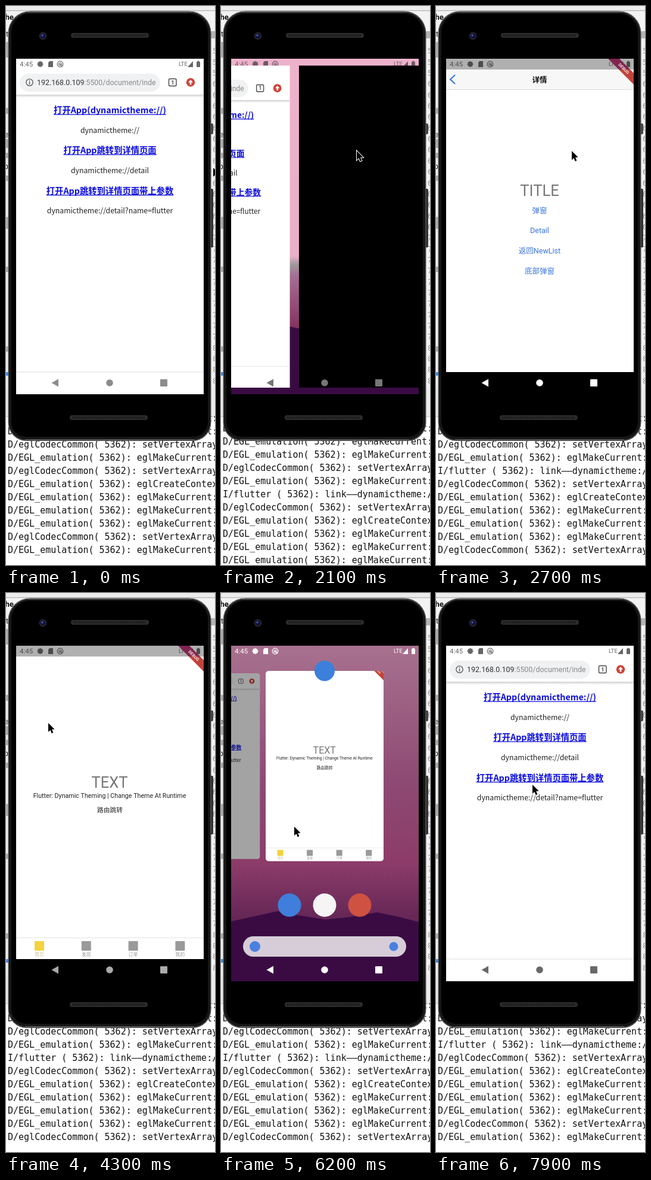
Write an HTML page with a canvas that moves like this. It is 351 px wide and 933 px high and loops after 8 s.

```html
<!DOCTYPE html>
<html>
<head>
<meta charset="utf-8">
<style>
html, body { margin: 0; width: 351px; height: 933px; overflow: hidden; background: #fff; }
canvas { display: block; }
</style>
</head>
<body>
<canvas id="stage" width="351" height="933"></canvas>
<script>
const c = document.getElementById('stage').getContext('2d');
const CJK = '"Noto Sans CJK SC", "Noto Sans CJK JP", "Noto Sans CJK", sans-serif';
const UI = 'Roboto, ' + CJK;
const MONO = '"DejaVu Sans Mono", monospace';
const SCREEN = { x: 17, y: 88, w: 315, h: 560 };

const lerp = (a, b, p) => a + (b - a) * p;
const span = (t, a, b) => Math.min(1, Math.max(0, (t - a) / (b - a)));
const easeOut = u => 1 - (1 - u) ** 2;
const smooth = u => u * u * (3 - 2 * u);

function rect(x, y, w, h, color, r = 0) {
  c.fillStyle = color;
  c.beginPath();
  c.roundRect(x, y, w, h, r);
  c.fill();
}
function disc(x, y, r, color) {
  c.fillStyle = color;
  c.beginPath();
  c.arc(x, y, r, 0, 7);
  c.fill();
}
function ring(x, y, r, color, width = 1.2) {
  c.strokeStyle = color;
  c.lineWidth = width;
  c.beginPath();
  c.arc(x, y, r, 0, 7);
  c.stroke();
}
function trace(points) {
  c.beginPath();
  points.forEach(([x, y]) => c.lineTo(x, y));
}
function poly(points, color) {
  trace(points);
  c.fillStyle = color;
  c.fill();
}
function line(points, color, width) {
  trace(points);
  c.strokeStyle = color;
  c.lineWidth = width;
  c.stroke();
}
// y is the middle of the capitals
function text(s, x, y, size, color, align = 'center', font = UI, weight = 400) {
  c.font = `${weight} ${size}px ${font}`;
  c.textAlign = align;
  c.fillStyle = color;
  c.fillText(s, x, y + size * 0.36);
  return c.measureText(s).width;
}
function gradient(y0, y1, stops) {
  const g = c.createLinearGradient(0, y0, 0, y1);
  stops.forEach(([at, color]) => g.addColorStop(at, color));
  return g;
}

const LOG = {
  C: 'D/eglCodecCommon( 5362): setVertexArray',
  M: 'D/EGL_emulation( 5362): eglMakeCurrent:',
  K: 'D/EGL_emulation( 5362): eglCreateContext',
  I: 'I/flutter ( 5362): link——dynamictheme://'
};
const LOG_ORDER = 'CMCKMMMCMICKMMMCM';

function desktop(t) {
  rect(0, 0, 351, 933, '#fff');
  rect(0, 0, 351, 8, '#ececec');
  rect(0, 7, 351, 1.5, '#b9b9b9');
  rect(0, 9, 351, 48, '#f3f3f3');
  rect(0, 57, 8, 629, '#f0f0f0');
  rect(343, 57, 8, 580, '#f2f2f2');
  rect(0, 637, 351, 49, '#ececec');
  rect(0, 685, 351, 1, '#c4c4c4');
  text('the', -6, 18, 13, '#111', 'left', UI, 700);
  text('t', 0, 47, 12, '#222', 'left');
  text('e', -2, 215, 12, '#333', 'left');
  text('o', -3, 268, 12, '#111', 'left');
  for (const [y, h] of [[60, 26], [170, 10], [222, 15], [245, 9], [283, 9], [352, 20], [435, 9], [568, 9]])
    rect(0, y, 4, h, '#b0b0b0');
  rect(0, 611, 4, 6, '#4a90e2');
  rect(344, 42, 7, 12, '#b5b5b5');
  for (let i = 0; i < 31; i++) {
    const y = 75 + i * 18.35;
    text(y < 120 ? '5' : y < 385 ? '6' : y < 565 ? '7' : '8', 347, y, 12, '#999', 'left', MONO);
  }
  const last = t < 1900 ? 8 : t < 2000 ? 9 : t < 2100 ? 11 : t < 2200 ? 13.23 : t < 6300 ? 15 : 16;
  for (let i = -3; i <= Math.ceil(last); i++) {
    const y = 908 + (i - last) * 22;
    if (y > 686) text(LOG[LOG_ORDER[i] || 'M'], 3, y, 15, '#111', 'left', MONO);
  }
}

function speaker(x, y) {
  rect(x, y, 131, 8, '#2c2c2c', 4);
  for (let i = 4; i < 127; i += 3) rect(x + i, y + 2, 1.5, 4, '#161616');
}
function phone() {
  rect(342, 196, 6, 18, '#444', 2);
  rect(342, 305, 6, 98, '#333', 2);
  rect(3.5, 8.5, 341, 717.5, '#4b4b4b', [37, 37, 31, 31]);
  rect(5, 10.5, 338, 713.5, '#161616', [35, 35, 29, 29]);
  rect(9, 13, 330, 706, '#000', [31, 31, 25, 25]);
  line([[36, 10], [312, 10]], '#777', 1);
  line([[32, 724], [316, 724]], '#666', 1.5);
  speaker(109, 45);
  speaker(107, 683);
  disc(62, 50, 6.5, '#23232b');
  disc(62, 50, 4, '#10123a');
  disc(61, 49, 1.8, '#4a55a8');
}

function statusIcons(color) {
  text('4:45', 23, 97, 11.5, color, 'left');
  for (let i = 0; i < 8; i++) {
    const a = i * Math.PI / 4;
    line([[57.5, 97], [57.5 + 5 * Math.cos(a), 97 + 5 * Math.sin(a)]], color, 2);
  }
  ring(57.5, 97, 2.8, color, 2.4);
  poly([[73, 92], [79, 92], [79, 102], [71, 102], [71, 94.5]], color);
  ring(91, 97, 4.8, color);
  ring(91, 97, 2, color);
  line([[91, 97], [95, 101]], color, 1.2);
  text('LTE', 290, 97, 9.5, color, 'left');
  poly([[314, 92], [314, 102], [305, 102]], color);
  rect(320, 93, 6, 9, color, 1);
  rect(321.5, 91.7, 3, 2, color);
}
function navIcons(color) {
  poly([[76.5, 629], [88, 622.5], [88, 635.5]], color);
  disc(174, 629, 5.8, color);
  rect(259, 623, 12, 12, color, 1);
}

function link(s, y, pressed) {
  c.font = `700 14.3px ${CJK}`;
  const w = c.measureText(s).width, x = 174.5 - w / 2;
  if (pressed) rect(x - 1, y - 11, w + 2, 21, '#cdc8f3');
  const color = pressed ? '#8a4a90' : '#0b0be0';
  text(s, 174.5, y, 14.3, color, 'center', CJK, 700);
  rect(x, y + 6.5, w, 1.2, color);
}
function browser(pressed) {
  rect(17, 88, 315, 560, '#fff');
  rect(17, 148, 315, 5, gradient(148, 153, [[0, '#cfcfcf'], [1, '#fff']]));
  if (pressed) rect(17, 148, 315, 2, '#3f7fd8');
  rect(23, 113, 236, 30, '#f0f1f2', 15);
  ring(39.5, 127.5, 5.7, '#555', 1.3);
  rect(38.8, 126.5, 1.4, 4.5, '#555');
  rect(38.8, 124, 1.4, 1.5, '#555');
  const w = text('192.168.0.109', 52, 128, 12.4, '#333', 'left');
  text(':5500/document/inde', 52 + w, 128, 12.4, '#8a8a8a', 'left');
  c.strokeStyle = '#444';
  c.lineWidth = 1.4;
  c.beginPath();
  c.roundRect(273.5, 121.5, 12.5, 12, 2);
  c.stroke();
  text('1', 280, 127.5, 8.5, '#444', 'center', UI, 700);
  disc(310, 127.5, 7.2, '#cf4237');
  poly([[310, 123], [314, 127.5], [311.3, 127.5], [311.3, 131.5], [308.7, 131.5], [308.7, 127.5], [306, 127.5]], '#fff');
  link('打开App(dynamictheme://)', 174);
  link('打开App跳转到详情页面', 241, pressed);
  link('打开App跳转到详情页面带上参数', 308.5);
  [['', 208], ['detail', 275], ['detail?name=flutter', 342]].forEach(([s, y]) =>
    text('dynamictheme://' + s, 174.5, y, 12.25, '#222', 'center', CJK));
  rect(17, 610.5, 315, 1, '#dedede');
}

function home() {
  rect(17, 88, 315, 523, '#fff');
  text('TEXT', 174, 316, 25.6, '#777');
  text('Flutter: Dynamic Theming | Change Theme At Runtime', 174, 338, 10.7, '#222');
  text('路由跳转', 174.5, 362.5, 10.75, '#222');
  rect(17, 575, 315, 1, '#e4e4e4');
  ['首页', '发现', '订单', '我的'].forEach((s, i) => {
    const x = 56 + i * 78.8;
    rect(x - 8, 581, 16, 16, i ? '#9a9a9a' : '#f4d33f', 1);
    text(s, x, 603, 7.8, i ? '#999' : '#c9bf94');
  });
}
function detail() {
  rect(17, 88, 315, 523, '#fff');
  rect(17, 106, 315, 33, '#f7f7f8');
  rect(17, 139, 315, 1, '#dcdcdc');
  line([[32, 115], [24, 122.5], [32, 130]], '#3a7ad6', 2.2);
  text('详情', 174, 123.5, 12.5, '#111', 'center', UI, 700);
  text('TITLE', 174, 308, 25.6, '#777');
  [['弹窗', 341], ['Detail', 374], ['返回NewList', 408], ['底部弹窗', 442]].forEach(([s, y]) =>
    text(s, 174, y, 12.5, '#3a74e0'));
}
function banner() {
  const color = gradient(88, 131, [[0, '#7d2452'], [0.41, '#86264a'], [0.42, '#c0443a'], [1, '#c0443a']]);
  poly([[289, 88], [308, 88], [332, 112], [332, 131]], color);
  c.save();
  c.translate(315.5, 104.5);
  c.rotate(Math.PI / 4);
  text('DEBUG', 0, 0, 7, '#f4e4e4', 'center', UI, 700);
  c.restore();
}
function app(t) {
  const push = easeOut(span(t, 2400, 2700)) - smooth(span(t, 3700, 4200));
  rect(17, 88, 315, 560, '#000');
  const page = (draw, dx) => {
    c.save();
    c.translate(dx, 0);
    draw();
    c.restore();
  };
  if (push < 1) page(home, -100 * push);
  if (push > 0) page(detail, 315 * (1 - push));
  rect(17, 611, 315, 37, '#000');
  rect(17, 88, 315, 18, '#b0b0b0');
  statusIcons('#4c4c4c');
  banner();
  navIcons(t < 3800 ? '#fff' : '#aaa');
}

function wallpaper(dimmed) {
  rect(17, 88, 315, 560, gradient(88, 540, dimmed
    ? [[0, '#a8718f'], [0.5, '#8d4a73'], [0.8, '#8d3c69'], [1, '#662757']]
    : [[0, '#eeb2cc'], [0.73, '#e9b0c8'], [0.76, '#a0989c'], [0.8, '#a56f95'], [1, '#85305f']]));
  poly([[17, 548], [50, 541], [95, 531], [130, 538], [175, 545], [215, 541], [262, 533], [300, 541], [332, 549], [332, 648], [17, 648]], '#3a0b43');
}
function card(draw, left, top, scale, y0, y1, radius = 0) {
  c.save();
  c.translate(left, top);
  c.scale(scale, scale);
  c.translate(-17, -y0);
  c.beginPath();
  c.roundRect(17, y0, 315, y1 - y0, radius);
  c.clip();
  draw();
  c.restore();
}
function switchApps(t) {
  const u = span(t, 1900, 2300), bump = Math.sin(Math.PI * u), scale = 1 - 0.04 * bump;
  const left = 17 - 315 * (1 - (1 - u) ** 1.5), top = 88 + 11.3 * bump;
  wallpaper(false);
  statusIcons('#6d5a64');
  card(() => browser(false), left, top, scale, 88, 648);
  card(() => rect(17, 88, 315, 560, '#000'), left + 315 * scale + 15 * bump, top, scale, 88, 648);
  navIcons('#777');
}
function recents(t) {
  const enter = easeOut(span(t, 5500, 6100)), open = easeOut(span(t, 6700, 7300));
  wallpaper(true);
  [['#3f7edb', 115], ['#f6f4f5', 174], ['#cf5142', 233]].forEach(([color, x]) => disc(x, 521, 19.5, color));
  rect(37, 573, 274, 34, '#d6cdd8', 17);
  disc(57, 590, 9, '#4a80e0');
  disc(290, 590, 7.5, '#4a80e0');
  card(() => { home(); banner(); }, lerp(17, 75, enter) + 330 * open, lerp(106, 130, enter), lerp(1, 0.629, enter), 106, 611, 8);
  disc(174 + 330 * open, 130, 17 * span(t, 5800, 6100), '#3c80dc');
  card(() => {
    browser(t >= 6700);
    rect(17, 88, 315, 560, `rgba(0,0,0,${0.36 * (1 - span(t, 6700, 7000))})`);
  }, lerp(lerp(-330, -128, enter), 17, open), lerp(134, 88, open), lerp(0.614, 1, open),
    lerp(106, 88, open), lerp(611, 648, open), 8 * (1 - open));
  statusIcons(open > 0.6 ? '#c4bcc0' : '#fff');
  navIcons(open > 0.6 ? '#ccc' : '#fff');
}

const MOVES = [[0, 348, 270], [700, 228, 242], [2900, 228, 242], [3600, 27, 117], [3800, 27, 117], [4300, 71, 217],
  [5300, 264, 628], [5600, 264, 628], [6200, 123, 390], [7100, 119, 378], [7400, 119, 378], [7900, 162, 320]];
function pointer(t) {
  const i = Math.max(1, MOVES.findIndex(m => m[0] >= t));
  const [a, b] = [MOVES[i - 1], MOVES[i]], p = smooth(span(t, a[0], b[0]));
  c.save();
  c.translate(lerp(a[1], b[1], p), lerp(a[2], b[2], p));
  trace([[0, 0], [0, 15], [3.4, 11.8], [5.8, 17.2], [8.4, 16], [6, 10.8], [10.6, 10.6]]);
  c.closePath();
  c.strokeStyle = '#fff';
  c.lineWidth = 2;
  c.stroke();
  c.fillStyle = '#000';
  c.fill();
  c.restore();
}

function draw(t) {
  desktop(t);
  phone();
  c.save();
  c.beginPath();
  c.rect(SCREEN.x, SCREEN.y, SCREEN.w, SCREEN.h);
  c.clip();
  if (t < 1900 || t >= 7300) {
    browser(t >= 1100 && t < 1900);
    statusIcons('#666');
    navIcons(t < 1900 ? '#8c8c8c' : '#686868');
  } else if (t < 2300) switchApps(t);
  else if (t < 2400) {
    rect(17, 88, 315, 560, '#000');
    navIcons('#fff');
  } else if (t < 5600) app(t);
  else recents(t);
  c.restore();
  pointer(t);
}

function tick() {
  draw(Math.floor(performance.now() % 8000 / 100) * 100);
  requestAnimationFrame(tick);
}
tick();
</script>
</body>
</html>
```
